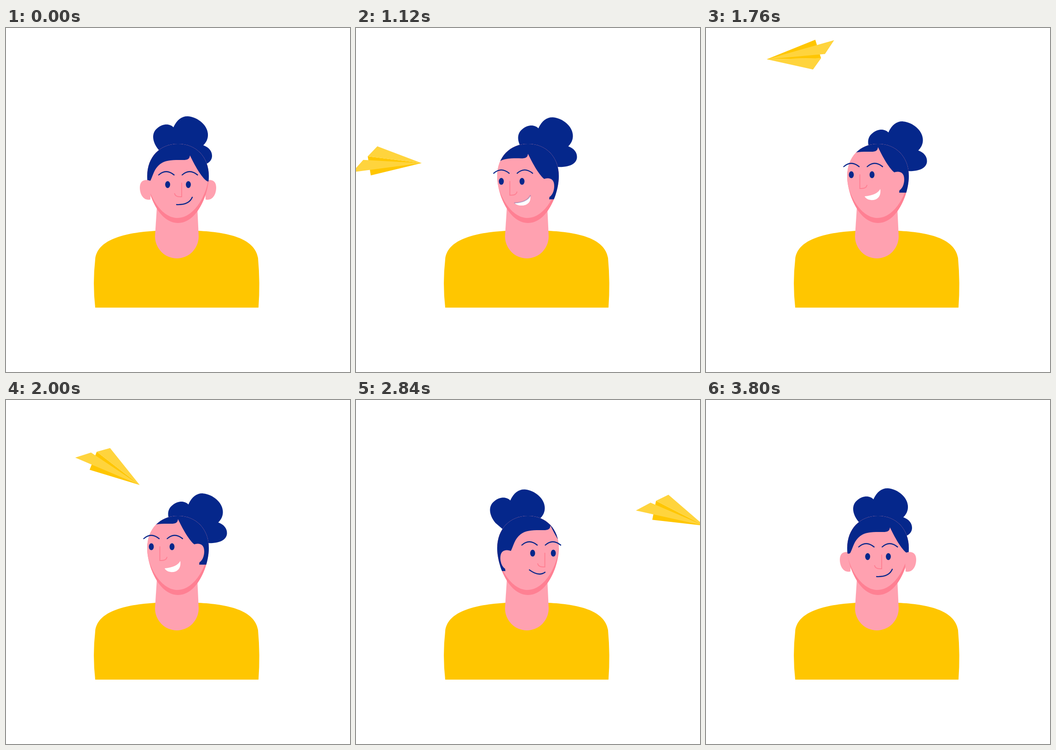
Recreate the animation shown at these times as an HTML page with a canvas. Size 748 by 748 pixels, loop 5000 ms.

```html
<!DOCTYPE html>
<html lang="en">
<head>
<meta charset="utf-8">
<title>Paper plane</title>
<style>
  html, body { margin: 0; height: 100%; overflow: hidden; background: #fff; }
  canvas { display: block; }
</style>
</head>
<body>
<canvas id="stage" width="748" height="748"></canvas>
<script>
const ctx = document.getElementById('stage').getContext('2d');
const { sin, cos, abs, max, min, exp, PI } = Math;
const LOOP = 5000;
const NAVY = '#05278b', SKIN = '#ffa1b0', SHADE = '#ff8093', YELLOW = '#ffc600', LIGHT = '#ffd43d';

const shirt = new Path2D('M194 608Q188 555 194 503C198 460 258 445 325 441H418C480 444 541 456 548 500Q553 555 549 608Z');
const neck = new Path2D('M328 390L324 453A47.5 48 0 0 0 419 453L416 390Z');
const head = new Path2D('M307 322C307 280 335 252 374 252C413 252 441 280 441 322C441 362 415 424 374 424C333 424 307 362 307 322Z');
const face = new Path2D('M300 240H448V322H441C441 355 413 413 374 413C335 413 307 355 307 322H300Z');
const ear = new Path2D('M316 333C305 328 291 329 291 347C291 362 299 376 314 373Z');
const bun = new Path2D('M346 277L332 265C318 248 315 228 330 217C342 207 357 208 364 216C372 198 384 191 396 192C418 194 438 212 439 230C440 242 434 250 429 255C442 260 448 268 448 278C448 290 437 300 410 300H380Z');
const hair = new Path2D('M400 277C399 285 395 287 385 287C365 287 348 286 335 296C322 306 320 320 314 332C312 335 308 335 305 332L299 352L302 376H250V200H500V376H446L449 352L443 332Q440 335 437 333C425 325 410 298 400 277Z');
const brow = new Path2D('M332 319.5Q348 305 365.5 319.5');
const nose = new Path2D('M7.5 337V367H3.5C-3 367 -7 364 -8 360');

// Plane parts, measured from its centre
const keel = new Path2D('M80 -38L-34 -7L-12 29Z');
const wings = new Path2D('M80 -38L-23 -35L-34 -7ZM80 -38L-40 4L-52 38Z');

const part = (t, from, to) => max(0, min(1, (t - from) / (to - from)));

// Eased 0 to 1 between two times
function ramp(t, from, to) {
  const k = part(t, from, to);
  return k < .5 ? 4 * k ** 3 : 1 - 4 * (1 - k) ** 3;
}

function pose(t) {
  const look = ramp(t, 40, 480), raise = ramp(t, 840, 1800);
  const swing = ramp(t, 2040, 2560), back = ramp(t, 3220, 3800);
  return {
    turn: -look + 1.88 * swing - .88 * back,
    lift: -2 * look - 16 * raise + 14 * swing + 4 * back,
    eyeX: -3 * look + 7 * swing - 4 * back,
    eyeY: 3.5 * (back - look),
    open: ramp(t, 880, 1280) - ramp(t, 2440, 2760)
  };
}

// Flies in, makes one loop, then glides away
function flight(t) {
  if (t < 1480) {
    const k = part(t, 840, 1480);
    return [340 * k - 95, 264 + 35 * sin(PI * k), 40 * (1 - k)];
  }
  if (t < 2000) {
    const k = part(t, 1480, 2000), angle = -307 * k, dir = (angle - 25) * PI / 180;
    return [220 + 19 * k - 60 * sin(dir), 192 - 118 * k + 79 * cos(dir), angle];
  }
  const k = part(t, 2000, 3180);
  return [
    211 + 523 * k + 89 * (1 - exp(-10 * k)),
    144 + 78 * k - 49 * sin(2 * PI * k),
    53 + 18 * k - 46 * k * k
  ];
}

function at(x, y, draw) {
  ctx.save();
  ctx.translate(x, y);
  draw();
  ctx.restore();
}

function fill(path, color) {
  ctx.fillStyle = color;
  ctx.fill(path);
}

function stroke(path, color) {
  ctx.strokeStyle = color;
  ctx.stroke(path);
}

function drawEar(right, turn, lift) {
  const shift = 26 * abs(turn);
  at(right ? 748 - shift : shift, lift, () => {
    if (right) ctx.scale(-1, 1);
    fill(ear, SKIN);
  });
}

function drawMouth(turn, lift, open) {
  const p = max(turn, 0), rise = 8 - 12 * p, sag = (9 + 4 * p) * (1 - .4 * open);
  const x = 388 + (turn < 0 ? 26 * turn : 6 * min(1, 2.2 * p));
  at(x, 376 + lift, () => {
    const line = `M-17 ${rise}Q${10 - 8 * p} ${sag} 17 ${-rise}`;
    if (open > 0) {
      const low = 8 + 14 * open;
      fill(new Path2D(`${line}C21 ${low} -12 ${low - 2} -17 ${rise}Z`), '#fff');
    }
    ctx.globalAlpha = 1 - open;
    stroke(new Path2D(line), NAVY);
  });
}

function drawPerson(t) {
  const { turn, lift, eyeX, eyeY, open } = pose(t);
  const faceX = 32.5 * turn, nearRight = turn < 0;

  fill(shirt, YELLOW);
  fill(neck, SKIN);
  at(-faceX, -.62 * lift, () => fill(bun, NAVY));
  drawEar(!nearRight, turn, lift);

  at(0, 0, () => {
    fill(head, SHADE);
    ctx.clip(head);
    at(-1, 0, () => fill(face, SKIN));
    at(26 * turn, lift, () => fill(hair, NAVY));
  });
  drawEar(nearRight, turn, lift);

  ctx.lineWidth = 2.3;
  ctx.lineCap = 'round';
  for (const side of [0, 1]) {
    at(faceX + 51 * side, lift, () => stroke(brow, NAVY));
    ctx.beginPath();
    ctx.ellipse(351.5 + 45 * side + faceX + eyeX, 340.5 + lift + eyeY, 5.4, 7.4, 0, 0, 2 * PI);
    ctx.fillStyle = NAVY;
    ctx.fill();
  }
  at(374.5 + faceX, lift, () => {
    ctx.scale(nearRight ? 1 + 2 * turn : 1, 1);
    ctx.lineWidth = 2;
    stroke(nose, SHADE);
  });
  drawMouth(turn, lift, open);
}

function drawPlane(t) {
  if (t < 840 || t >= 3180) return;
  const [x, y, angle] = flight(t);
  at(x, y, () => {
    ctx.rotate(angle * PI / 180);
    fill(keel, YELLOW);
    fill(wings, LIGHT);
  });
}

function frame() {
  const t = performance.now() % LOOP;
  ctx.fillStyle = '#fff';
  ctx.fillRect(0, 0, 748, 748);
  drawPerson(t);
  drawPlane(t);
  requestAnimationFrame(frame);
}
frame();
</script>
</body>
</html>
```
